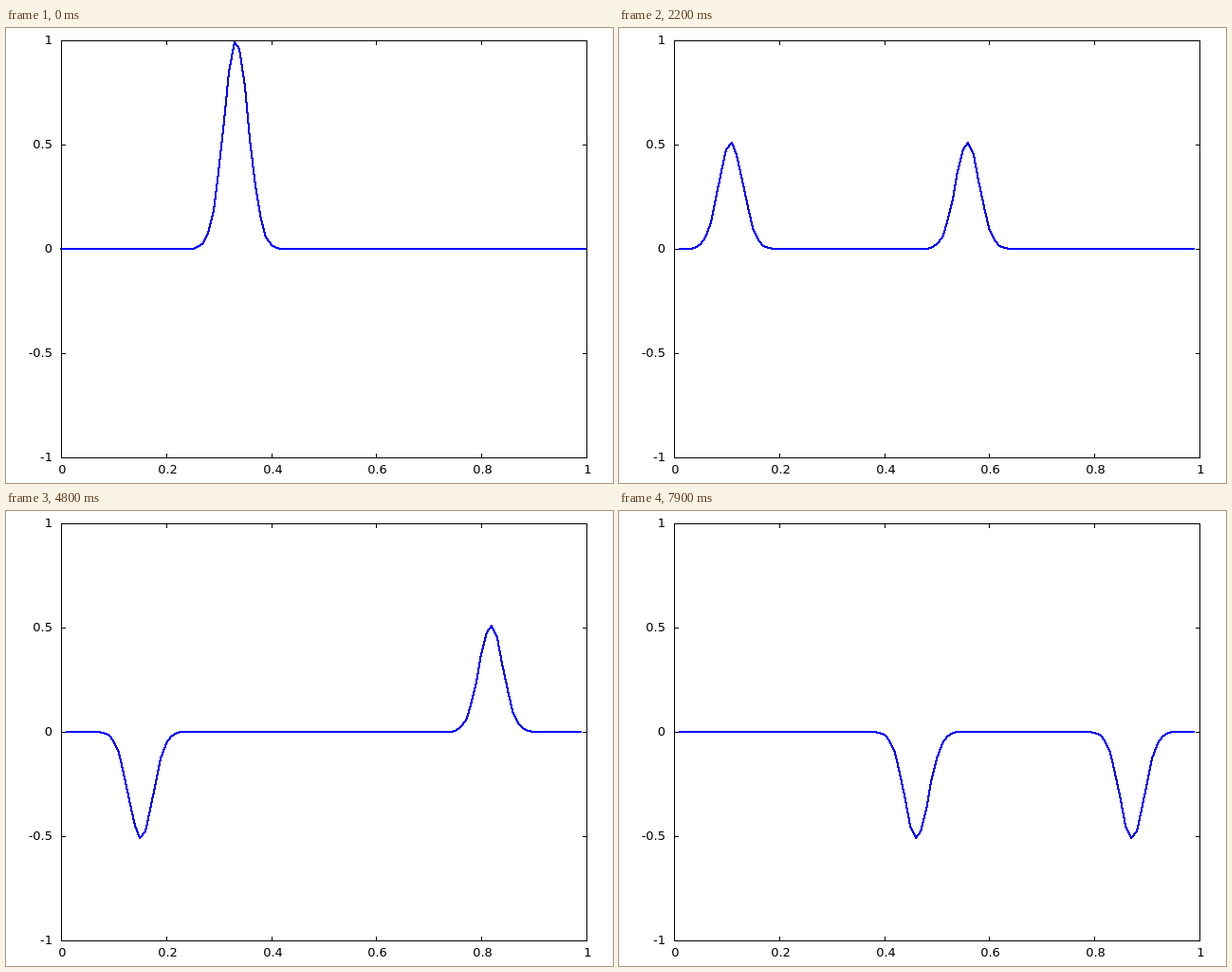
Animation, 640 px wide and 480 px high, one loop 8 s. Source, as an HTML page with a canvas:

```html
<!DOCTYPE html>
<html lang="en">
<head>
<meta charset="utf-8">
<title>Plucked string</title>
<style>
  html, body { margin: 0; width: 640px; height: 480px; overflow: hidden; background: #fff; }
  canvas, svg { position: absolute; left: 0; top: 0; display: block; }
  text { font: 13px "DejaVu Sans", sans-serif; fill: #000; }
</style>
</head>
<body>
<canvas id="plot" width="640" height="480"></canvas>
<svg id="labels" width="640" height="480"></svg>
<script>
const STEP = 100, COUNT = 80, CELLS = 100;
const LEFT = 58, RIGHT = 612, TOP = 13, BOTTOM = 453, TICK = 5;
const ctx = document.getElementById('plot').getContext('2d');
const labels = document.getElementById('labels');

const mapX = x => Math.round(LEFT + x * (RIGHT - LEFT));
const mapY = y => Math.round(BOTTOM - (y + 1) / 2 * (BOTTOM - TOP));
const xTicks = [0, 0.2, 0.4, 0.6, 0.8, 1];
const yTicks = [-1, -0.5, 0, 0.5, 1];

function addLabel(value, x, y, anchor) {
  const el = document.createElementNS('http://www.w3.org/2000/svg', 'text');
  el.setAttribute('x', x);
  el.setAttribute('y', y);
  el.setAttribute('text-anchor', anchor);
  el.textContent = value;
  labels.append(el);
}

// Wave equation with fixed ends, released from rest as a narrow bump.
function buildStates() {
  const start = Array.from({ length: CELLS + 1 },
    (_, i) => Math.exp(-900 * (i / CELLS - 1 / 3) ** 2));
  const states = [start];
  let prev = start, cur = start;
  while (states.length < COUNT) {
    const next = cur.map((_, i) =>
      i === 0 || i === CELLS ? 0 : cur[i - 1] + cur[i + 1] - prev[i]);
    prev = cur;
    cur = next;
    states.push(cur);
  }
  return states;
}

// Hard-edged line drawn with a 2 x 2 brush.
function line(x0, y0, x1, y1) {
  const n = Math.max(Math.abs(x1 - x0), Math.abs(y1 - y0));
  for (let i = 0; i <= n; i++) {
    const x = Math.round(x0 + (x1 - x0) * i / n);
    const y = Math.round(y0 + (y1 - y0) * i / n);
    ctx.fillRect(x - 1, y - 1, 2, 2);
  }
}

function drawTicks() {
  for (const v of xTicks) {
    ctx.fillRect(mapX(v), TOP, 1, TICK);
    ctx.fillRect(mapX(v), BOTTOM - TICK + 1, 1, TICK);
  }
  for (const v of yTicks) {
    ctx.fillRect(LEFT, mapY(v), TICK, 1);
    ctx.fillRect(RIGHT - TICK + 1, mapY(v), TICK, 1);
  }
}

function drawBorder() {
  ctx.strokeStyle = '#000';
  ctx.lineWidth = 1;
  ctx.strokeRect(LEFT + 0.5, TOP + 0.5, RIGHT - LEFT, BOTTOM - TOP);
}

function draw(k) {
  ctx.fillStyle = '#fff';
  ctx.fillRect(0, 0, 640, 480);
  ctx.fillStyle = '#000';
  drawTicks();
  ctx.fillStyle = '#00f';
  const u = states[k];
  // The end points are plotted only for the starting shape.
  const first = k === 0 ? 0 : 1;
  for (let i = first; i < CELLS - first; i++) {
    line(mapX(i / CELLS), mapY(u[i]), mapX((i + 1) / CELLS), mapY(u[i + 1]));
  }
  drawBorder();
}

for (const v of xTicks) addLabel(v, mapX(v) + 1.5, 470, 'middle');
for (const v of yTicks) addLabel(String(v).replace('\u2212', '-'), 49, mapY(v) + 4, 'end');

const states = buildStates();
const origin = performance.now();
let shown = -1;

function tick() {
  const k = Math.floor((performance.now() - origin) / STEP) % COUNT;
  if (k !== shown) draw(shown = k);
  requestAnimationFrame(tick);
}
tick();
</script>
</body>
</html>
```
